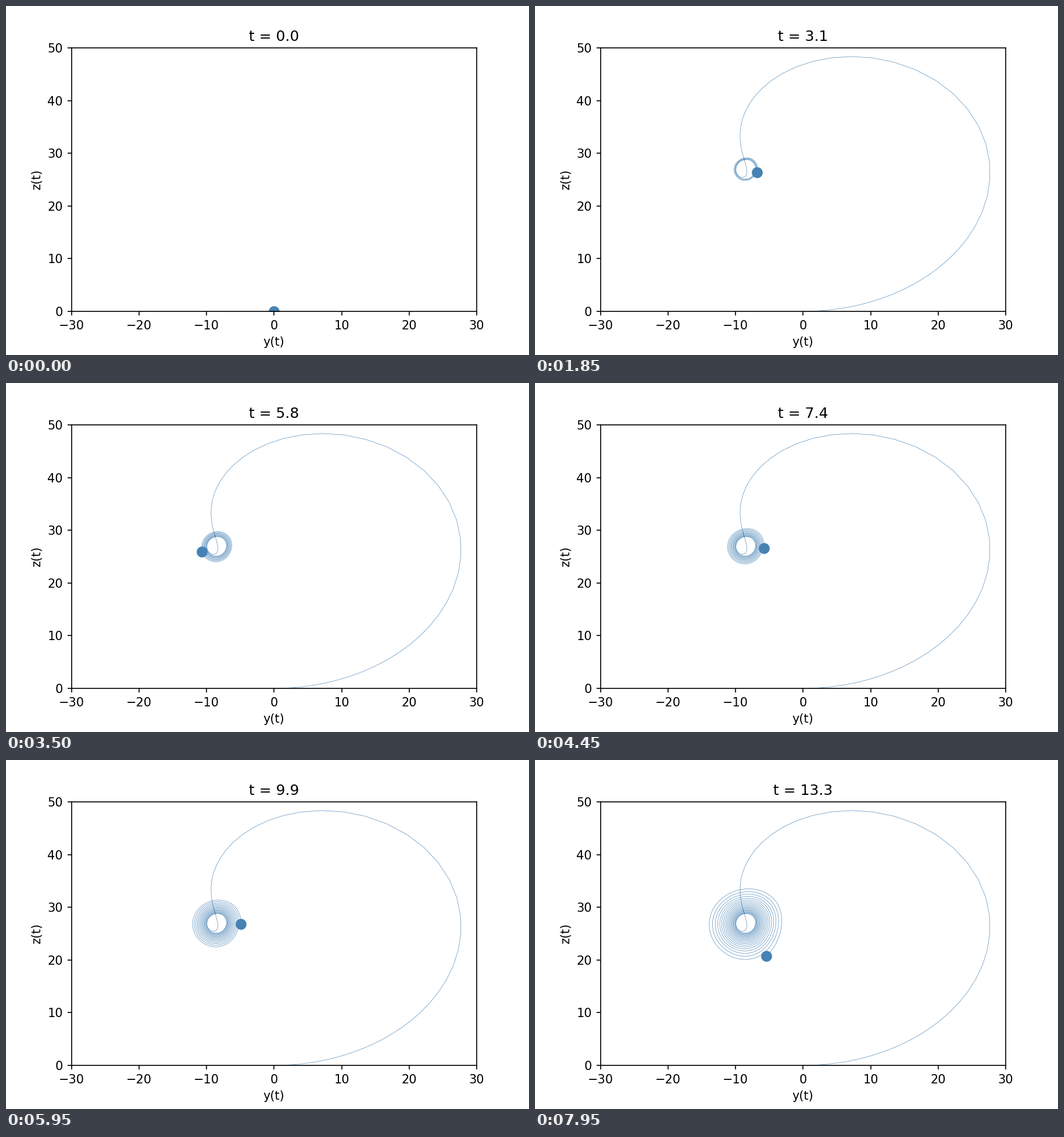
Write a matplotlib script that moves like this. It is 900 px wide and 600 px high and loops after 8000 ms.

```python
import numpy as np
import matplotlib.pyplot as plt
from matplotlib.animation import FuncAnimation

FRAMES, INTERVAL = 160, 50
STEP = 10              # trajectory samples per frame
DT = 50 / 5999         # time between samples
SUBSTEPS = 4
SIGMA, RHO, BETA = 10.0, 28.0, 8 / 3
COLOR = "steelblue"


def lorenz(p):
    x, y, z = p
    return np.array([SIGMA * (y - x), x * (RHO - z) - y, x * y - BETA * z])


def rk4(p, h):
    a = lorenz(p)
    b = lorenz(p + h / 2 * a)
    c = lorenz(p + h / 2 * b)
    d = lorenz(p + h * c)
    return p + h / 6 * (a + 2 * b + 2 * c + d)


def trajectory(start, count):
    points = [np.array(start, float)]
    for _ in range(count - 1):
        p = points[-1]
        for _ in range(SUBSTEPS):
            p = rk4(p, DT / SUBSTEPS)
        points.append(p)
    return np.array(points).T


_, ys, zs = trajectory((1, 0, 0), (FRAMES - 1) * STEP + 1)

plt.rcParams.update({"font.family": "DejaVu Sans", "font.size": 10})
fig, ax = plt.subplots(figsize=(6, 4), dpi=150)
fig.subplots_adjust(left=0.125, right=0.9, bottom=0.125, top=0.88)
ax.set(xlim=(-30, 30), ylim=(0, 50), xlabel="y(t)", ylabel="z(t)")
title = ax.set_title("t = 0.0")
trail, = ax.plot([], [], color=COLOR, lw=0.3)
dot, = ax.plot([], [], "o", color=COLOR, ms=8)


def update(frame):
    i = frame * STEP
    trail.set_data(ys[:i + 1], zs[:i + 1])
    dot.set_data([ys[i]], [zs[i]])
    title.set_text(f"t = {i * DT:.1f}")
    return trail, dot, title


anim = FuncAnimation(fig, update, frames=FRAMES, interval=INTERVAL,
                     repeat=True, repeat_delay=0, blit=False)
plt.show()
```
